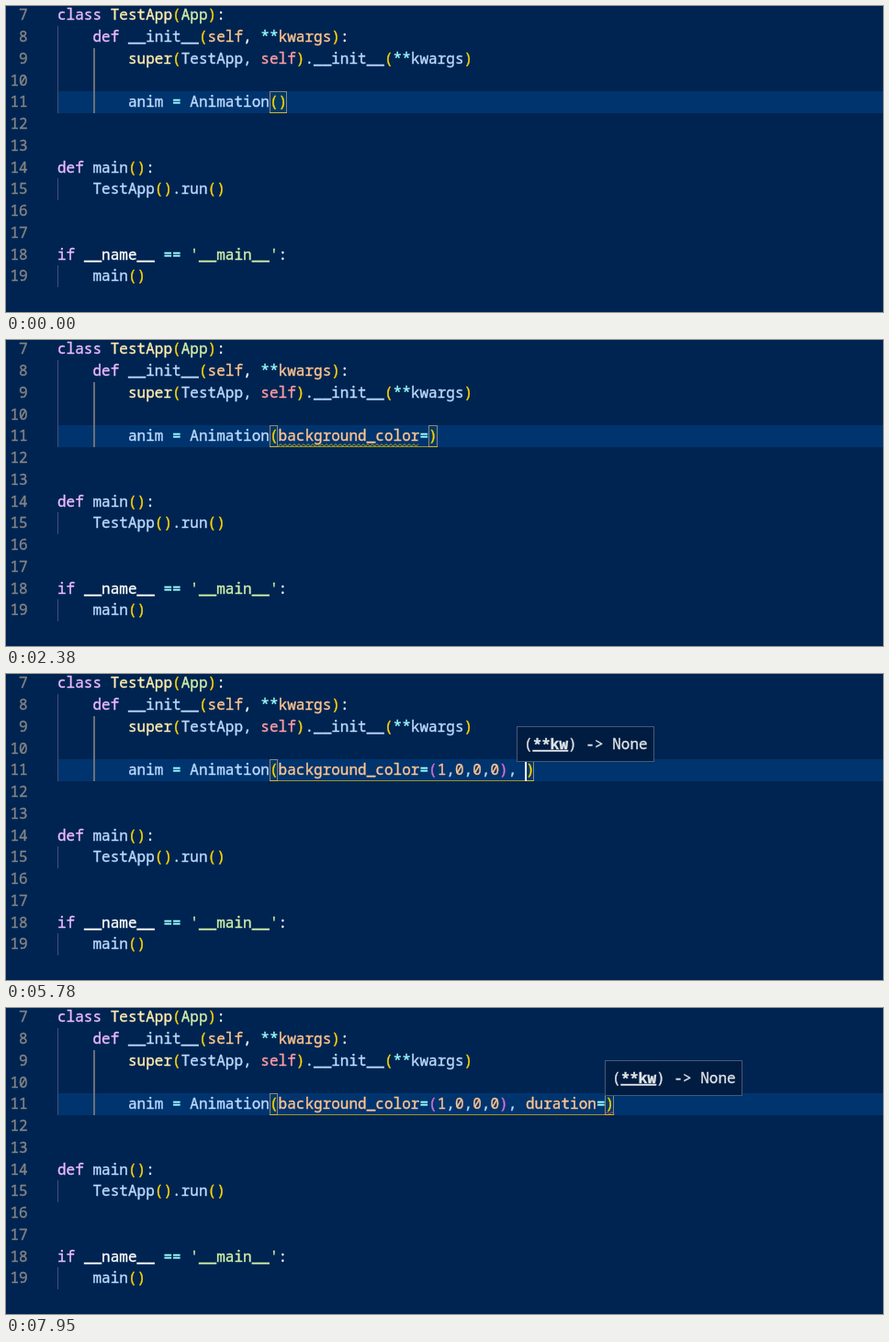
An HTML page that plays this animation: 955x334 px, repeating every 8000 ms.

```html
<!DOCTYPE html>
<html lang="en">
<head>
<meta charset="utf-8">
<title>Typing in a code editor</title>
<style>
html, body { margin: 0; width: 955px; height: 334px; overflow: hidden; background: #002451; }
svg { display: block; }
text {
  font: 16px "Noto Sans Mono", "DejaVu Sans Mono", monospace;
  letter-spacing: .02px; white-space: pre; font-variant-ligatures: none;
}
/* a thin outline gives the strokes a slightly heavier weight */
text, tspan { fill: currentColor; stroke: currentColor; stroke-width: .35px; }
.b { font-weight: 600; }
</style>
</head>
<body>
<svg id="stage" width="955" height="334"></svg>
<script>
const LOOP = 8000, CHAR = 9.6195, LEFT = 56, ARG = 25;
const colors = {
  k: '#ebbbff', c: '#ffeead', g: '#d1f1a9', f: '#bbdaff', n: '#ffc58f', r: '#ff9da4',
  o: '#99ffff', w: '#ffffff', y: '#ffd700', m: '#da70d6'
};
const colX = col => LEFT + col * CHAR;
const baseline = row => Math.ceil(110 + (row - 11) * 23.75);

const rect = (x, y, w, h, fill, more = '') =>
  `<rect x="${x}" y="${y}" width="${w}" height="${h}" fill="${fill}" ${more}/>`;
const text = (x, y, body, color) => `<text x="${x}" y="${y}" color="${color}">${body}</text>`;
const span = (key, body) => `<tspan color="${colors[key]}">${body}</tspan>`;
const path = (d, stroke, width = 1) =>
  `<path d="${d}" fill="none" stroke="${stroke}" stroke-width="${width}"/>`;

// A code row: pieces written as "key:text", joined by "|"
function code(row, col, source) {
  const body = source.split('|').map(p => span(p[0], p.slice(2))).join('');
  return text(colX(col), baseline(row), body, '#fff');
}

function page() {
  let out = rect(LEFT, 93, 899, 24, '#00346e');
  for (let n = 7; n < 20; n++)
    out += text(n < 10 ? 14 : 4.5, baseline(n), n, '#858585');
  out += rect(56, 22, 1, 95, '#404f7d') + rect(95, 46, 2, 71, '#6a7078');
  out += rect(56, 188, 1, 24, '#404f7d') + rect(56, 283, 1, 24, '#404f7d');
  return out +
    code(7, 0, 'k:class |c:TestApp|y:(|g:App|y:)|w::') +
    code(8, 4, 'k:def |f:__init__|y:(|n:self|w:, |o:**|n:kwargs|y:)|w::') +
    code(9, 8, 'c:super|y:(|f:TestApp, |r:self|y:)|f:.__init__|y:(|o:**|f:kwargs|y:)') +
    code(14, 0, 'k:def |f:main|y:()|w::') +
    code(15, 4, 'f:TestApp|y:()|f:.run|y:()') +
    code(18, 0, "k:if |w:__name__ |o:== |g:'__main__'|w::") +
    code(19, 4, 'f:main|y:()');
}

function argSpans(args) {
  return args.replace(/\w+(=?)|[()]|[^\w()]+/g, (s, eq) => {
    if (/^\d/.test(s)) return span('n', s);
    if (/^\w/.test(s)) return eq ? span('n', s.slice(0, -1)) + span('o', '=') : span('f', s);
    return span(/[()]/.test(s) ? 'm' : 'f', s);
  });
}

function squiggle(from, to, color) {
  const end = colX(to);
  let x = colX(from), d = `M${x} 116`;
  for (let up = 1; x < end - 2; up ^= 1) d += `L${x += 2.5} ${up ? 113.5 : 116}`;
  return path(d, color);
}

function brackets(open, close, color) {
  const box = (from, to) => {
    const x = Math.round(colX(from)), w = Math.round(colX(to)) - x - 1;
    return rect(x + .5, 93.5, w, 23, '#0064001a', 'stroke="#888"');
  };
  const boxes = close === open + 1
    ? box(open, close + 1)
    : box(open, open + 1) + box(close, close + 1);
  const x = Math.round(colX(open));
  return boxes + rect(x, 116, Math.round(colX(close + 1)) - x, 1, color, 'opacity=".6"');
}

function tooltip(col, plain) {
  const x = Math.round(colX(col)) + .5;
  const kw = plain ? '**kw' : '<tspan class="b" text-decoration="underline">**kw</tspan>';
  return rect(x, 57.5, 149, 38, '#001c40', 'stroke="#455a7c"') +
    text(x + 7.5, 82, `(${kw}) -&gt; None`, '#dfe3e8');
}

function icon(x, y, isArg) {
  if (isArg)
    return path(`M${x} ${y + 15}V${y}H${x + 15}V${y + 15}`, '#e0e4ea', 1.3) +
      path(`M${x} ${y + 15}h3m2 0h2m2 0h2m2 0h3`, '#e0e4ea', 1.3);
  return path(`M${x} ${y + 5}l4 -4 4 4 -4 4zM${x + 7} ${y + 5}h4M${x + 8} ${y + 5}v7h3` +
    `M${x + 11} ${y + 5}l2 -2 3 2 -3 3zM${x + 11} ${y + 12}l2 -2 3 2 -3 3z`, '#ee9d28', 1.5);
}

function suggestions(col, words, typed) {
  const x = Math.round(colX(col)) + .5;
  let out = rect(x, 117.5, 412, words.length * 24, '#001c40', 'stroke="#454545"');
  out += rect(x + .5, 118, 411, 23.5, '#607188');
  words.forEach((word, i) => {
    const y = 135 + 24 * i;
    out += icon(x + 6, y - 13, i === 0);
    out += text(x + 29, y,
      `<tspan class="b" color="#bbdaff">${word.slice(0, typed)}</tspan>${word.slice(typed)}`, '#fff');
  });
  out += text(x + 234.5, 135, 'keyword argument…', '#d0d6de');
  if (x < 400) {
    const d = x + 413;
    out += rect(d, 117.5, 300, 100, '#001c40', 'stroke="#454f63"') +
      text(d + 7, 140, 'keyword argument of Animation', '#c0c8d2') +
      text(d + 7, 164, 'Kivy-snippets)', '#c0c8d2') +
      text(d + 7, 206, words[0], '#fff');
  }
  return out;
}

const bWords = ['background_color', 'bool', 'bytes', 'bytearray', 'bin', 'breakpoint',
  'BaseException', 'BlockingIOError', 'BrokenPipeError'];
const dWords = ['duration', 'dict', 'dir', 'divmod', 'delattr', 'DeprecationWarning',
  'def', 'del', 'debug'];
const BG = 'background_color', RGBA = BG + '=(1,0,0,0)';
const warn = (from, to) => [from, to, '#cca700'];
const error = (from, to) => [from, to, '#f14c4c'];

// Each step changes part of the state; "|" in args is the caret position
const steps = [
  [0, { args: '|', caret: false }],
  [230, { caret: true }],
  [610, { args: 'b|' }],
  [690, { list: [26, bWords, 1] }],
  [760, { args: 'ba|' }],
  [830, { list: [27, ['background_color', 'BaseException'], 2] }],
  [1210, { args: BG + '|', list: null }],
  [1380, { wave: warn(25, 27) }],
  [1690, { caret: false }],
  [1920, { args: BG + '=|', caret: true, wave: warn(25, 41) }],
  [2380, { caret: false }],
  [2530, { args: BG + '=(|)', caret: true, wave: null }],
  [2610, { tip: 43 }],
  [2690, { args: BG + '=(1|)' }],
  [2770, { tip: 44 }],
  [2840, { wave: error(42, 46) }],
  [3150, { args: BG + '=(1,|)' }],
  [3220, { tip: 45 }],
  [3300, { wave: error(42, 47) }],
  [3470, { args: BG + '=(1,0|)', tip: 46, wave: error(42, 48) }],
  [3930, { args: BG + '=(1,0,|)' }],
  [4010, { tip: 47 }],
  [4160, { args: BG + '=(1,0,0|)', wave: null }],
  [4230, { tip: 48 }],
  [4540, { args: BG + '=(1,0,0,|)', tip: 49 }],
  [4770, { args: BG + '=(1,0,0,0|)' }],
  [4850, { tip: 50 }],
  [5160, { args: RGBA + '|' }],
  [5230, { tip: 51 }],
  [5630, { args: RGBA + ',|' }],
  [5710, { tip: 52 }],
  [5780, { args: RGBA + ', |' }],
  [5860, { tip: 53 }],
  [6170, { args: RGBA + ', d|' }],
  [6250, { tip: 54, plain: true, list: [54, dWords, 1] }],
  [6320, { args: RGBA + ', du|' }],
  [6400, { tip: 55, list: [55, ['duration'], 2] }],
  [6510, { args: RGBA + ', dur|' }],
  [6560, { tip: 56, list: [56, ['duration'], 3] }],
  [6630, { args: RGBA + ', dura|', tip: 57, list: [57, ['duration'], 4] }],
  [6780, { tip: null, list: null }],
  [6940, { args: RGBA + ', duration|' }],
  [7170, { caret: false }],
  [7320, { args: RGBA + ', duration=|', caret: true, wave: warn(53, 61) }],
  [7400, { tip: 62, plain: false }],
  [7780, { caret: false }],
  [7950, { wave: error(62, 63) }]
];

function draw(s) {
  const caret = ARG + s.args.indexOf('|');
  const args = s.args.replace('|', '');
  const end = ARG + args.length;
  const inner = s.args.endsWith('|)');
  let out = page();
  out += inner ? brackets(42, caret, colors.m) : brackets(24, end, colors.y);
  out += text(colX(8), baseline(11),
    span('f', 'anim ') + span('o', '= ') + span('f', 'Animation') + span('y', '(') +
    argSpans(args) + span('y', ')'), '#fff');
  if (s.wave) out += squiggle(...s.wave);
  if (s.caret) out += rect(Math.floor(colX(caret)), 93, 2, 24, '#fff');
  if (s.tip) out += tooltip(s.tip, s.plain);
  if (s.list) out += suggestions(...s.list);
  return out;
}

const stage = document.getElementById('stage');
let shown = 0;
function frame() {
  const t = performance.now() % LOOP;
  const past = steps.filter(([at]) => at <= t);
  if (past.length !== shown) {
    shown = past.length;
    stage.innerHTML = draw(Object.assign({}, ...past.map(([, change]) => change)));
  }
  requestAnimationFrame(frame);
}
frame();
</script>
</body>
</html>
```
